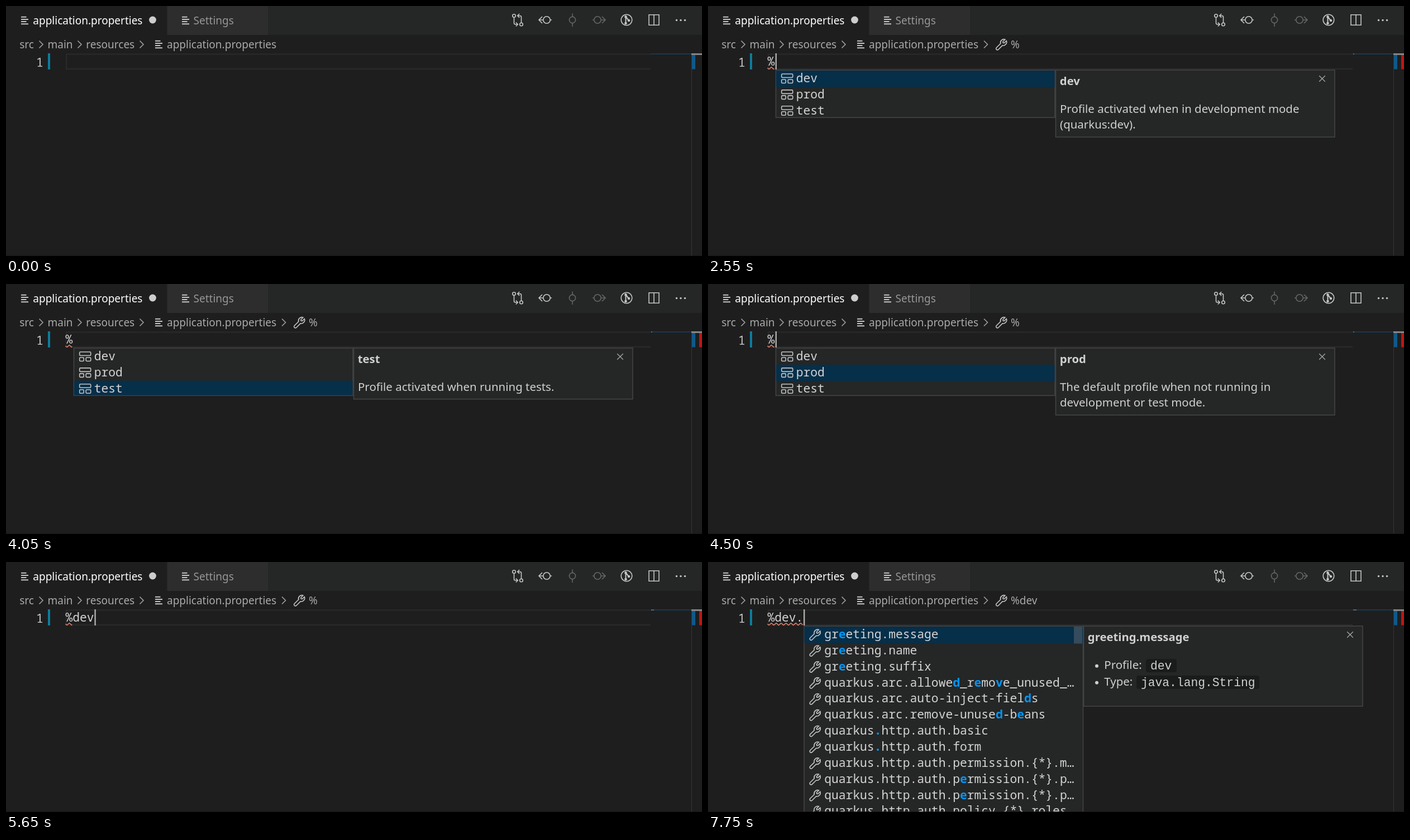
An HTML page for the animation above (8 s loop, 1246 by 449 pixels).

```html
<!DOCTYPE html>
<html lang="en">
<head>
<meta charset="utf-8">
<title>Editor completion</title>
<style>
  html, body { margin: 0; width: 1246px; height: 449px; overflow: hidden; background: #1e1e1e; }
  svg { display: block; }
  text { font: 19px "Noto Sans", sans-serif; fill: #a9a9a9; white-space: pre; }
  .mono { font: 21.3px "Noto Sans Mono", monospace; fill: #d4d4d4; }
  .hit { font-weight: 700; fill: #0097fb; }
  .doc { font-size: 20.45px; fill: #d0d0d0; }
  .title { font-size: 20.3px; font-weight: 700; }
  .code { font: 21.3px "Liberation Mono", monospace; fill: #d0d0d0; }
  .line { fill: none; stroke: #c5c5c5; stroke-width: 1.6; }
  .dim { stroke: #656565; }
  .box { fill: #252626; stroke: #454545; stroke-width: 1.5; }
</style>
</head>
<body>
<svg width="1246" height="449" viewBox="0 0 1246 449">
  <defs>
    <path id="file" class="line" style="stroke-width:1.9" d="M0 .8H9.5M0 5H13M0 9H9.5M0 13.2H13"/>
    <path id="chevron" class="line" style="stroke:#a0a0a0" d="M0 0L6.5 6.5L0 13"/>
    <path id="wrench" class="line" d="M19.8 4.5L15.8 8.3L13.6 8L13.4 6L17.3 2A6.3 6.3 0 0 0 9.2 9.6L1.9 16.8A2.4 2.4 0 0 0 5.3 20.2L12.6 12.9A6.3 6.3 0 0 0 19.8 4.5Z"/>
    <path id="struct" class="line" d="M1.5 0H18.5Q20 0 20 1.5V5Q20 6.5 18.5 6.5H1.5Q0 6.5 0 5V1.5Q0 0 1.5 0ZM1.5 10H6Q7.5 10 7.5 11.5V15Q7.5 16.5 6 16.5H1.5Q0 16.5 0 15V11.5Q0 10 1.5 10ZM13 10H18.5Q20 10 20 11.5V15Q20 16.5 18.5 16.5H13Q11.5 16.5 11.5 15V11.5Q11.5 10 13 10Z"/>
    <path id="close" class="line" style="stroke:#a8a8a8;stroke-width:1.3" d="M-5.3 -5.3L5.3 5.3M5.3 -5.3L-5.3 5.3"/>
  </defs>

  <!-- tabs -->
  <path fill="#252626" d="M288 0H1246V52H288Z"/>
  <path fill="#2d2d2d" d="M289 0H469V52H289Z"/>
  <use href="#file" x="27" y="19"/>
  <text x="48.3" y="32.5" style="fill:#fff">application.properties</text>
  <circle cx="262.5" cy="25" r="6.4" fill="#cdcdcd"/>
  <use href="#file" x="315" y="19"/>
  <text x="335.6" y="32.5" style="fill:#969696">Settings</text>

  <!-- toolbar -->
  <g class="line">
    <circle cx="909.5" cy="17.5" r="2.8"/>
    <circle cx="922.5" cy="33" r="2.8"/>
    <path d="M909.5 20.3V30.5Q909.5 33 912 33H916M912.8 29.5L916.3 33L912.8 36.5M922.5 30.2V20Q922.5 17.5 920 17.5H916M919.2 14L915.7 17.5L919.2 21"/>
    <circle cx="968" cy="25" r="6.2"/>
    <path d="M962 25H954.5M960 19L954 25L960 31M974 25H977"/>
    <circle cx="1111" cy="25" r="9.8"/>
    <path stroke-width="2" d="M1109.5 17V33M1109.5 19.5L1115 26"/>
    <path d="M1151 15.8H1169V34.2H1151ZM1160 15.8V34.2"/>
  </g>
  <g class="line dim">
    <circle cx="1014" cy="25" r="5.6"/>
    <path d="M1014 13.5V19.4M1014 30.6V37"/>
    <circle cx="1059" cy="25" r="6.2"/>
    <path d="M1065 25H1072.5M1067 19L1073 25L1067 31M1053 25H1050"/>
  </g>
  <g fill="#c5c5c5">
    <circle cx="1109.5" cy="19.5" r="2.3"/><circle cx="1109.5" cy="31" r="2.3"/><circle cx="1115" cy="26" r="2.3"/>
    <circle cx="1200.5" cy="25.5" r="1.7"/><circle cx="1208" cy="25.5" r="1.7"/><circle cx="1215.5" cy="25.5" r="1.7"/>
  </g>

  <!-- breadcrumbs -->
  <text x="24.2" y="75.5">src</text>
  <use href="#chevron" x="59.5" y="62.5"/>
  <text x="74.5" y="75.5">main</text>
  <use href="#chevron" x="128.5" y="62.5"/>
  <text x="143.3" y="75.5">resources</text>
  <use href="#chevron" x="239.5" y="62.5"/>
  <use href="#file" x="267" y="62"/>
  <text x="288" y="75.5">application.properties</text>
  <g id="crumb">
    <use href="#chevron" x="494" y="62.5"/>
    <use href="#wrench" x="514.5" y="58"/>
    <text id="symbol" x="542" y="75.5"></text>
  </g>

  <!-- editor -->
  <path fill="none" stroke="#292929" stroke-width="2.4" d="M1154 86.5H108V113H1154"/>
  <path fill="#0c7d9d" d="M75 85H79V114H75Z"/>
  <text class="mono" x="54" y="108.5" style="fill:#c6c6c6">1</text>
  <path fill="#173c52" d="M1154 85.3H1227V87H1154Z"/>
  <path id="minimap" fill="#5d7d8c" d=""/>
  <path fill="#373737" d="M1227 85H1228V449H1227Z"/>
  <path fill="#0d5a8c" d="M1228 88H1234V113.5H1228Z"/>
  <path id="error" fill="#c01414" d="M1241 88H1246V113.5H1241Z"/>
  <path fill="#868686" d="M1227 85H1246V88H1227Z"/>
  <text id="source" class="mono" x="106.5" y="107"></text>
  <path id="squiggle" fill="none" stroke="#f48771" stroke-width="1.4"/>
  <g id="popup"></g>
  <rect id="cursor" y="85" width="2.4" height="29" fill="#aeafad"/>
  <path fill="#171717" d="M0 448H1246V449H0Z"/>
</svg>

<script>
const LOOP = 8000, CHAR = 12.78, ROW = 28.85;
const $ = id => document.getElementById(id);

// Each schedule lists [start time, value].
const typed = [[0, ''], [1550, '%'], [5650, '%dev'], [6750, '%dev.']];
const marked = [[0, 0], [1600, 1], [5700, 4], [6800, 5]];
const symbol = [[0, ''], [1850, '%'], [6000, '%dev']];
const popup = [[0, ''], [1600, 'dev'], [2600, 'prod'], [3300, 'test'], [4300, 'prod'],
  [4950, 'dev'], [5650, ''], [6850, 'keys'], [6900, 'keysDoc']];
const blinks = [300, 750, 1300, 2000, 2550, 3050, 3500, 4050, 4500, 5000, 5500, 6100, 6650, 7300, 7750];
const at = (schedule, t) => schedule.filter(s => s[0] <= t).pop()[1];

const profiles = {
  dev: ['Profile activated when in development mode', '(quarkus:dev).'],
  prod: ['The default profile when not running in', 'development or test mode.'],
  test: ['Profile activated when running tests.']
};
// Square brackets mark the matched letters.
const keys = [
  'gr[e]eting.message', 'gr[e]eting.name', 'gr[e]eting.suffix',
  'quarkus.arc.allowe[d]_r[e]mo[v]e_unused_…', 'quarkus.arc.auto-inject-fiel[d]s',
  'quarkus.arc.remove-unuse[d]-b[e]ans', 'quarkus[.]http.auth.basic', 'quarkus[.]http.auth.form',
  'quarkus.http.auth.permission.{*}.m…', 'quarkus.http.auth.p[e]rmission.{*}.p…',
  'quarkus.http.auth.p[e]rmission.{*}.p…', 'quarkus.http.auth.policy.{*}.roles…'
];

const text = (cls, x, y, s) => `<text class="${cls}" x="${x}" y="${y}">${s}</text>`;
const rect = (x, y, w, h, attrs) => `<rect x="${x}" y="${y}" width="${w}" height="${h}" ${attrs}/>`;
const icon = (id, x, y) => `<use href="#${id}" x="${x}" y="${y}"/>`;

function list(x, height, items, selected, glyph, dx, dy) {
  const top = 116 + selected * ROW;
  const rows = items.map((s, i) => icon(glyph, x + dx, 116 + i * ROW + dy) +
    text('mono', x + 36.7, 137 + i * ROW, s.replace(/\[(.)\]/g, '<tspan class="hit">$1</tspan>')));
  return rect(x + .5, 115, 499.5, height, 'class="box"') +
    rect(x + 1, top, 498.5, Math.min(ROW + .5, 115 + height - top - .7), 'fill="#062f4a"') + rows.join('');
}

const panel = (x, height, title) => rect(x + .5, 115, 499.5, height, 'class="box"') +
  text('doc title', x + 7.8, 142.3, title) + icon('close', x + 477.5, 130.5);

const bullet = (y, label, chipX, chipW, code) => `<circle cx="696" cy="${y - 5.2}" r="3" fill="#d0d0d0"/>` +
  text('doc', 709.3, y, label) + rect(chipX, y - 18, chipW, 24, 'rx="4" fill="#1a1b1b"') +
  text('code', chipX + 8, y + 1, code);

function popupMarkup(kind) {
  if (!kind) return '';
  if (profiles[kind]) {
    const names = Object.keys(profiles), lines = profiles[kind];
    return list(121, 85.3, names, names.indexOf(kind), 'struct', 10.7, 6) +
      panel(622, 63 + 28.7 * lines.length, kind) +
      lines.map((s, i) => text('doc', 630, 191.9 + i * 28.5, s)).join('');
  }
  const rows = list(171.5, 360, keys, 0, 'wrench', 9.5, 3.5) +
    rect(655, 116, 15, 30.5, 'fill="#797979" opacity=".4"');
  return kind === 'keys' ? rows : rows + panel(672, 144, 'greeting.message') +
    bullet(191.9, 'Profile:', 784, 55, 'dev') + bullet(222, 'Type:', 767, 220, 'java.lang.String');
}

function wave(chars) {
  const end = 106.5 + chars * CHAR;
  let d = '';
  for (let x = 106.5; x < end; x++) {
    const phase = ((x - 106.5) / 8.75 + .21) % 1;
    d += `${d ? 'L' : 'M'}${x} ${109.6 + 4 * (1 - Math.abs(1 - 2 * phase))}`;
  }
  return d;
}

let shown = '';
function frame(now) {
  const t = now % LOOP;
  const state = [typed, marked, symbol, popup].map(s => at(s, t));
  const [source, errors, crumb, kind] = state;
  const cols = source.length;
  const key = state.join('|');
  if (key !== shown) {
    shown = key;
    $('source').textContent = source;
    $('squiggle').setAttribute('d', wave(errors));
    $('error').style.display = errors ? '' : 'none';
    $('crumb').style.display = crumb ? '' : 'none';
    $('symbol').textContent = crumb;
    $('minimap').setAttribute('d', cols ? `M1155 85.5h${1 + cols}v1.5h${-1 - cols}Z` : '');
    $('popup').innerHTML = popupMarkup(kind);
    $('cursor').setAttribute('x', cols ? 108 + 12.6 * cols : 106.5);
  }
  $('cursor').style.display = blinks.filter(b => b <= t).length % 2 ? '' : 'none';
  requestAnimationFrame(frame);
}
frame(0);
</script>
</body>
</html>
```
